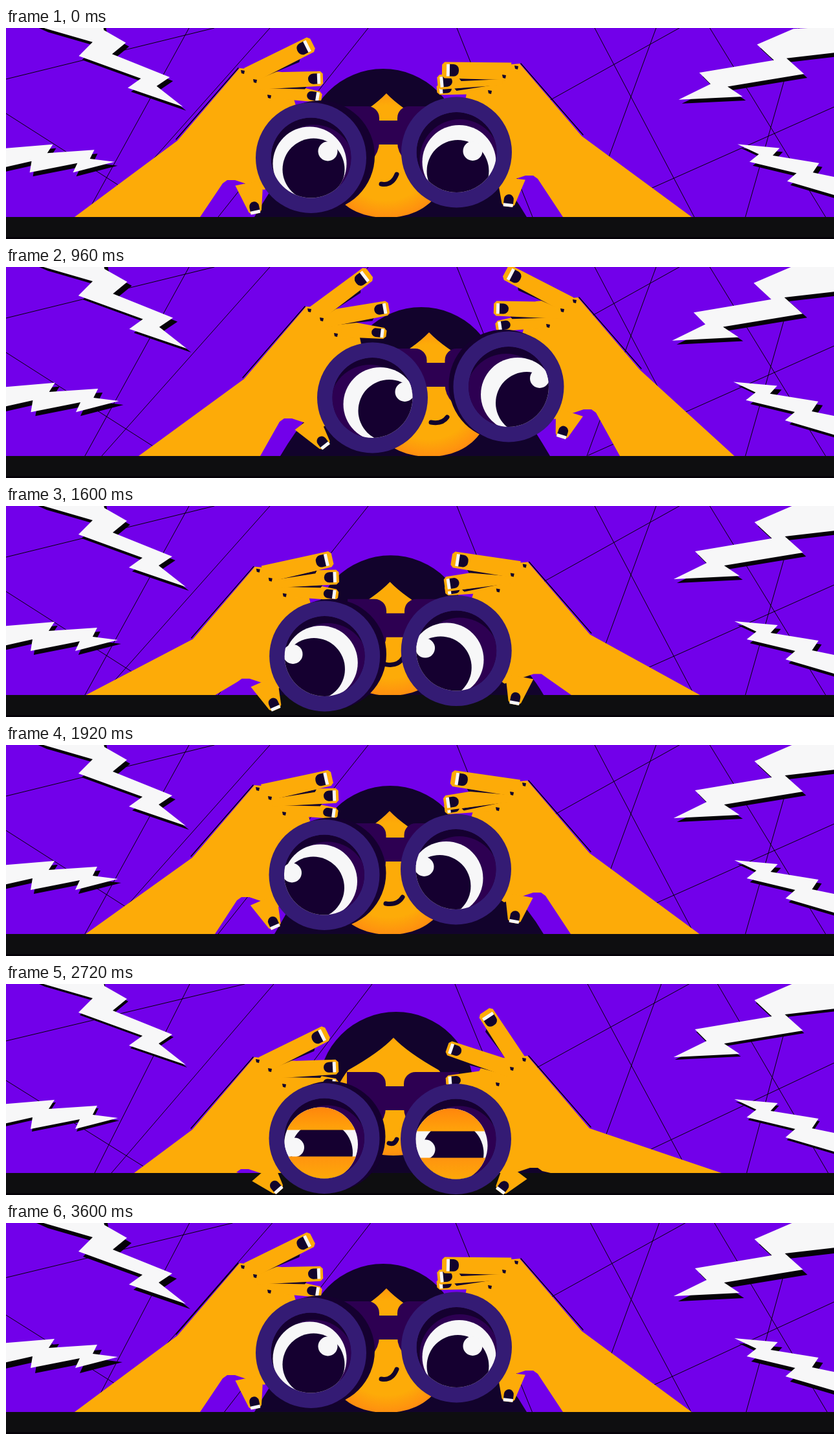
These frames come from a looping animation (1280x326 px, 3.68 s). An HTML page with a canvas:

```html
<!DOCTYPE html>
<html lang="en">
<head>
<meta charset="utf-8">
<title>Lookout</title>
<style>
html, body { margin: 0; width: 100%; height: 100%; overflow: hidden; background: #7200ea; }
canvas { display: block; width: 1280px; height: 326px; }
</style>
</head>
<body>
<canvas id="stage" width="1280" height="326"></canvas>
<script>
const ctx = document.getElementById('stage').getContext('2d');
const LOOP = 3680, STEP = 80, FLOOR = 292;
const C = {
  bg: '#7200ea', skin: '#fdab08', ink: '#12032c', ring: '#341b74', plum: '#2d0052',
  hole: '#150030', white: '#f7f7f8', bar: '#0e0e10', black: '#050208'
};

// Key poses. Finger, thumb and notch values are relative to the hand;
// eye values (white, pupil, glint) are relative to the lens.
const start = {
  left: { at: [366, 68], lens: [471.5, 200.5], f1: [108, -44], f2: [124, 10], f3: [122, 39],
    thumb: [20, 219], notch: -12, arm: [106, 300], side: 13,
    eye: [[-2, 9], [4, 18], [26, -10]] },
  right: { at: [789, 61], lens: [696.5, 192], f1: [-115, 4], f2: [-122, 23], f3: [-123, 34],
    thumb: [-13, 215], notch: 14, arm: [1060, 861], side: 0,
    eye: [[4, 15], [2, 29], [25, -2]] },
  bridge: [591, 143], hair: [583, 63], peak: [588, 101], chin: 293,
  mouth: [580, 241, 24, -15], body: [384, 805], lid: 0, bolt: 0, shade: [5, 6]
};
const lookRight = {
  left: { at: [461, 67], lens: [558.5, 202], f1: [94, -61], f2: [123, -3], f3: [119, 37],
    thumb: [26, 210], notch: -23, arm: [198, 386], side: 0,
    eye: [[11, 10], [27, 20], [50, -8]] },
  right: { at: [866, 54], lens: [770.5, 186], f1: [-110, -41], f2: [-124, 13], f3: [-121, 38],
    thumb: [-12, 213], notch: 18, arm: [1117, 938], side: -6,
    eye: [[13, 11], [26, 24], [46, -11]] },
  bridge: [659, 148], hair: [638, 62], peak: [650, 102], chin: 293,
  mouth: [652, 242, 25, -9], body: [421, 840], lid: 0, bolt: 1, shade: [2, 4]
};
const farRight = {
  left: { at: [469, 67], lens: [566.5, 202], f1: [93, -58], f2: [123, -4], f3: [119, 36],
    thumb: [26, 211], notch: -27, arm: [205, 393], side: 0,
    eye: [[12, 10], [26, 20], [50, -9]] },
  right: { at: [879, 53], lens: [777, 185], f1: [-107, -46], f2: [-125, 11], f3: [-122, 39],
    thumb: [-21, 211], notch: 14, arm: [1126, 949], side: -7,
    eye: [[14, 12], [28, 25], [48, -13]] },
  bridge: [664.5, 148], hair: [642, 62], peak: [654, 101], chin: 293,
  mouth: [657, 240, 25, -8], body: [424, 841], lid: 0, bolt: 1.3, shade: [7, 6]
};
const rise = {
  left: { at: [411, 61], lens: [511, 190], f1: [111, -29], f2: [124, 13], f3: [122, 36],
    thumb: [28, 214], notch: -18, arm: [141, 337], side: 6,
    eye: [[-2, 8], [-8, 17], [-24, -6]] },
  right: { at: [822, 52], lens: [716.5, 183], f1: [-113, -18], f2: [-123, 20], f3: [-124, 36],
    thumb: [-18, 215], notch: 13, arm: [1094, 899], side: 0,
    eye: [[-6, 13], [-10, 23], [-25, -5]] },
  bridge: [617.5, 133], hair: [612, 57], peak: [610, 97], chin: 292,
  mouth: [605, 240, 26, -11], body: [416, 837], lid: 0, bolt: .6, shade: [2, 4]
};
const lookLeft = {
  left: { at: [389, 68], lens: [492, 200.5], f1: [115, -18], f2: [125, 10], f3: [124, 38],
    thumb: [28, 215], notch: -13, arm: [123, 323], side: 10,
    eye: [[-6, 10], [-17, 20], [-50, -3]] },
  right: { at: [801, 61], lens: [695.5, 192], f1: [-113, -10], f2: [-124, 29], f3: [-123, 38],
    thumb: [-16, 214], notch: 14, arm: [1072, 873], side: 0,
    eye: [[-15, 14], [-25, 26], [-49, -4]] },
  bridge: [601.5, 143], hair: [594, 63], peak: [593, 102], chin: 293,
  mouth: [587, 245, 26, -10], body: [415, 831], lid: 0, bolt: 1, shade: [5, 6]
};
const duck = {
  left: { at: [389, 119], lens: [492, 238.5], f1: [108, -44], f2: [125, 9], f3: [124, 36],
    thumb: [34, 201], notch: -14, arm: [198, 360], side: 9,
    eye: [[-5, 9], [-4, 22], [-46, 14]] },
  right: { at: [801, 117], lens: [695.5, 239.5], f1: [-61, -75], f2: [-119, -19], f3: [-121, 33],
    thumb: [-38, 204], notch: 9, arm: [1106, 842], side: 0,
    eye: [[-8, 10], [-5, 22], [-47, 16]] },
  bridge: [601, 158], hair: [603, 43], peak: [599, 83], chin: 265,
  mouth: [592, 246, 12, -6], body: [400, 842], lid: 1, bolt: 1, shade: [2, 4]
};
const end = { ...start, bolt: 1, shade: [7, 8] };

const down = (pt, d) => [pt[0], pt[1] + d];
const lower = (s, d) => ({ ...s, at: down(s.at, d), lens: down(s.lens, d) });
const dip = {
  ...lookLeft, left: lower(lookLeft.left, 33), right: lower(lookLeft.right, 33),
  bridge: down(lookLeft.bridge, 24), hair: down(lookLeft.hair, 14), peak: down(lookLeft.peak, 16)
};

const smooth = x => x * x * (3 - 2 * x);
const easeIn = x => x * x;
const easeOut = x => 1 - (1 - x) * (1 - x);
const keys = [
  [0, start], [320, lookRight, smooth], [960, farRight, easeOut], [1040, farRight],
  [1280, rise, smooth], [1640, dip, smooth], [1920, lookLeft, smooth], [2320, lookLeft],
  [2640, duck, smooth], [2960, duck], [3460, end, smooth], [LOOP, end]
];

function mix(a, b, k) {
  if (typeof a === 'number') return a + (b - a) * k;
  if (Array.isArray(a)) return a.map((v, i) => mix(v, b[i], k));
  return Object.fromEntries(Object.keys(a).map(n => [n, mix(a[n], b[n], k)]));
}
function poseAt(t) {
  const i = keys.findIndex(k => k[0] > t);
  const [t0, a] = keys[i - 1], [t1, b, ease = smooth] = keys[i];
  return mix(a, b, ease((t - t0) / (t1 - t0)));
}

function poly(pts, fill) {
  ctx.beginPath();
  pts.forEach(p => ctx.lineTo(p[0], p[1]));
  ctx.closePath();
  ctx.fillStyle = fill;
  ctx.fill();
}
function disc(x, y, r, fill) {
  ctx.beginPath();
  ctx.arc(x, y, r, 0, 7);
  ctx.fillStyle = fill;
  ctx.fill();
}
function box(x, y, w, h, r, fill) {
  ctx.beginPath();
  ctx.roundRect(x, y, w, h, r);
  ctx.fillStyle = fill;
  ctx.fill();
}

const lines = [
  [0, 79, 322, 0], [283, 0, 122, 292], [408, 0, 148, 292], [0, 132, 240, 285],
  [560, 0, 328, 292], [697, 0, 814, 292], [910, 0, 1064, 292], [1005, 0, 898, 292],
  [1041, 0, 700, 190], [1088, 0, 1267, 292], [1226, 0, 1143, 292], [1280, 122, 900, 291]
];
const wobble = [
  [0, 9, 47, 0], [1, 0, 15, 0], [6, 0, 15, 0], [0, 17, 0, 14], [6, 0, 16, 0], [-3, 0, -1, 0],
  [-11, 0, -8, 0], [8, 0, 8, 0], [15, 0, 10, 0], [12, 0, 4, 0], [-3, 0, 2, 0], [0, 0, 0, 10]
];
function drawLines(n) {
  const k = [0, .6, 1, .6][n % 4];
  ctx.strokeStyle = C.black;
  ctx.lineWidth = 1;
  ctx.beginPath();
  lines.forEach((l, i) => {
    const [x, y, u, v] = l.map((c, j) => c + wobble[i][j] * k);
    ctx.moveTo(x, y);
    ctx.lineTo(u, v);
  });
  ctx.stroke();
}

const bolts = [
  { c: [130, 15], p: [[58, 0], [134, 22], [112, 44], [211, 80], [190, 95], [278, 125], [236, 92],
    [257, 78], [165, 41], [187, 23], [152, 3], [150, -8], [40, -8]] },
  { c: [1290, 40], p: [[1290, -4], [1215, 0], [1157, 25], [1184, 50], [1065, 70], [1083, 88],
    [1032, 113], [1134, 108], [1110, 92], [1232, 72], [1204, 47], [1290, 37]] },
  { c: [-8, 200], p: [[-8, 186], [75, 179], [66, 193], [141, 188], [134, 202], [173, 207],
    [107, 224], [114, 209], [38, 224], [41, 206], [-8, 217]] },
  { c: [1290, 230], p: [[1126, 178], [1193, 184], [1182, 196], [1256, 208], [1246, 223],
    [1290, 232], [1290, 262], [1205, 237], [1220, 224], [1145, 206], [1160, 194]] }
];
function drawBolts(p) {
  const s = .97 + .03 * p.bolt;
  for (const b of bolts) {
    const at = (dx, dy) => b.p.map(q => q.map((v, i) => b.c[i] + (v - b.c[i]) * s + (i ? dy : dx)));
    poly(at(...p.shade), C.black);
    poly(at(0, 0), C.white);
  }
}

function drawHead(p) {
  const [hx, hy] = p.hair, [x, y] = p.peak, [bl, br] = p.body, R = 120;
  ctx.fillStyle = C.ink;
  ctx.beginPath();
  ctx.moveTo(bl, FLOOR);
  ctx.quadraticCurveTo(bl + 45, 215, hx - R, hy + R);
  ctx.arc(hx, hy + R, R, Math.PI, 0);
  ctx.quadraticCurveTo(br - 45, 215, br, FLOOR);
  ctx.fill();

  const c = p.chin, glow = ctx.createRadialGradient(x, c - 100, 30, x, c - 100, 102);
  glow.addColorStop(0, C.skin);
  glow.addColorStop(.6, C.skin);
  glow.addColorStop(1, '#ff8d10');
  ctx.fillStyle = glow;
  ctx.beginPath();
  ctx.moveTo(x, y);
  ctx.quadraticCurveTo(x - 22, y + 23, x - 70, y + 50);
  ctx.bezierCurveTo(x - 120, c - 70, x - 80, c, x, c);
  ctx.bezierCurveTo(x + 80, c, x + 120, c - 70, x + 70, y + 50);
  ctx.quadraticCurveTo(x + 22, y + 23, x, y);
  ctx.fill();

  const [mx, my, dx, dy] = p.mouth;
  ctx.strokeStyle = C.ink;
  ctx.lineWidth = 7;
  ctx.lineCap = 'round';
  ctx.beginPath();
  ctx.moveTo(mx, my);
  ctx.quadraticCurveTo(mx + dx * .7, my + 3, mx + dx, my + dy);
  ctx.stroke();

  const [bx, by] = p.bridge;
  box(bx - 74, by - 22, 60, 95, [0, 18, 40, 0], C.plum);
  box(bx + 14, by - 22, 85, 95, [18, 0, 0, 40], C.plum);
  box(bx - 25, by, 50, 37, 0, C.plum);
}

// A tapered finger whose nail sits `rim` px behind the tip.
function finger(o, base, tip, w0, w1, rim, nail, gap) {
  const dx = tip[0] - base[0], dy = tip[1] - base[1], len = Math.hypot(dx, dy);
  const a = w0 / 2, b = w1 / 2, h = w1 * nail;
  ctx.save();
  ctx.translate(o[0] + base[0], o[1] + base[1]);
  ctx.rotate(Math.atan2(dy, dx));
  if (gap) {
    const g = gap * 4;
    poly([[len * .12, gap * a * .9], [len * .75, gap * b], [len * .72, gap * b + g]], C.ink);
  }
  poly([[0, -a], [len - 4, -b], [len, -b + 4], [len, b - 4], [len - 4, b], [0, a]], C.skin);
  const x = len - rim;
  box(x - 19, -h / 2, 15, h, [8, 0, 0, 8], C.ink);
  box(x - 5, -h / 2, 5, h, 0, C.white);
  ctx.restore();
}

function drawArm(s, dir) {
  const [x, y] = s.at, at = (dx, dy) => [x + dir * dx, y + dy];
  const elbow = at(-101, 106), wrist = at(-5, -6), notch = [x + s.notch, y + 167];
  ctx.strokeStyle = C.black;
  ctx.lineWidth = 1.5;
  ctx.beginPath();
  ctx.moveTo(elbow[0] - dir * 2, elbow[1] - 2);
  ctx.lineTo(wrist[0] - dir * 2, wrist[1]);
  ctx.stroke();
  poly([[s.arm[0], FLOOR], elbow, wrist, at(60, 0), at(75, 28), s.lens,
    [notch[0] + dir * 45, notch[1] + 15], notch, [notch[0] - dir * 12, notch[1]],
    [notch[0] - dir * 19, notch[1] + 5], [s.arm[1], FLOOR]], C.skin);
  finger(s.at, [dir * 50, 28], s.f3, 26, 17, 4, .8, 0);
  finger(s.at, [dir * 22, 14], s.f2, 26, 23, 4, .7, dir);
  finger(s.at, [dir * 8, 6], s.f1, 27, 25, 7, .75, dir);
  for (const [dx, dy] of [[0, 0], [19, 14], [41, 38]]) {
    const [u, v] = at(dx, dy);
    poly([[u - 3, v - 3], [u + 3, v - 2], [u + 2, v + 3], [u - 2, v + 2]], C.ink);
  }
}

function drawThumb(s, dir) {
  finger(s.at, [s.notch + dir * 22, 171], s.thumb, 44, 20, 0, .75, 0);
}

function drawLens(s, lid) {
  const [x, y] = s.lens, spot = i => [x + s.eye[i][0], y + s.eye[i][1]];
  if (Math.abs(s.side) > .5) disc(x + s.side, y - 3, 85.5, C.hole);
  disc(x, y, 85.5, C.ring);
  ctx.save();
  ctx.beginPath();
  ctx.arc(x, y, 62, 0, 7);
  ctx.clip();
  ctx.fillStyle = C.hole;
  ctx.fill();
  disc(x + (s.eye[0][0] > 8 ? -4 : 5), y + 11, 62, C.plum);
  const [ex, ey] = spot(0);
  disc(ex, ey, 57, C.white);
  ctx.beginPath();
  ctx.arc(ex, ey, 57, 0, 7);
  ctx.save();
  ctx.clip();
  disc(...spot(1), 48, C.hole);
  ctx.restore();
  disc(...spot(2), 15, C.white);
  if (lid > 0) {
    ctx.beginPath();
    ctx.arc(ex, ey, 57, 0, 7);
    ctx.clip();
    const g = ctx.createLinearGradient(0, ey - 57, 0, ey + 57);
    g.addColorStop(0, '#ff860c');
    g.addColorStop(.3, '#ffa30a');
    g.addColorStop(.7, '#ff960e');
    g.addColorStop(1, C.skin);
    ctx.fillStyle = g;
    ctx.fillRect(ex - 60, ey - 60, 120, 3 + 35 * lid);
    ctx.fillRect(ex - 60, ey + 57 - 38 * lid, 120, 60);
  }
  ctx.restore();
}

function draw(n) {
  const p = poseAt(n * STEP);
  ctx.fillStyle = C.bg;
  ctx.fillRect(0, 0, 1280, 326);
  drawLines(n);
  drawBolts(p);
  drawHead(p);
  drawArm(p.left, 1);
  drawArm(p.right, -1);
  ctx.fillStyle = C.bar;
  ctx.fillRect(0, FLOOR, 1280, 34);
  ctx.fillStyle = C.black;
  ctx.fillRect(0, 323, 1280, 3);
  drawThumb(p.left, 1);
  drawThumb(p.right, -1);
  drawLens(p.left, p.lid);
  drawLens(p.right, p.lid);
}

let t0 = null, last = -1;
function tick(now) {
  t0 ??= now;
  const n = Math.floor((now - t0) % LOOP / STEP);
  if (n !== last) draw(last = n);
  requestAnimationFrame(tick);
}
requestAnimationFrame(tick);
</script>
</body>
</html>
```
